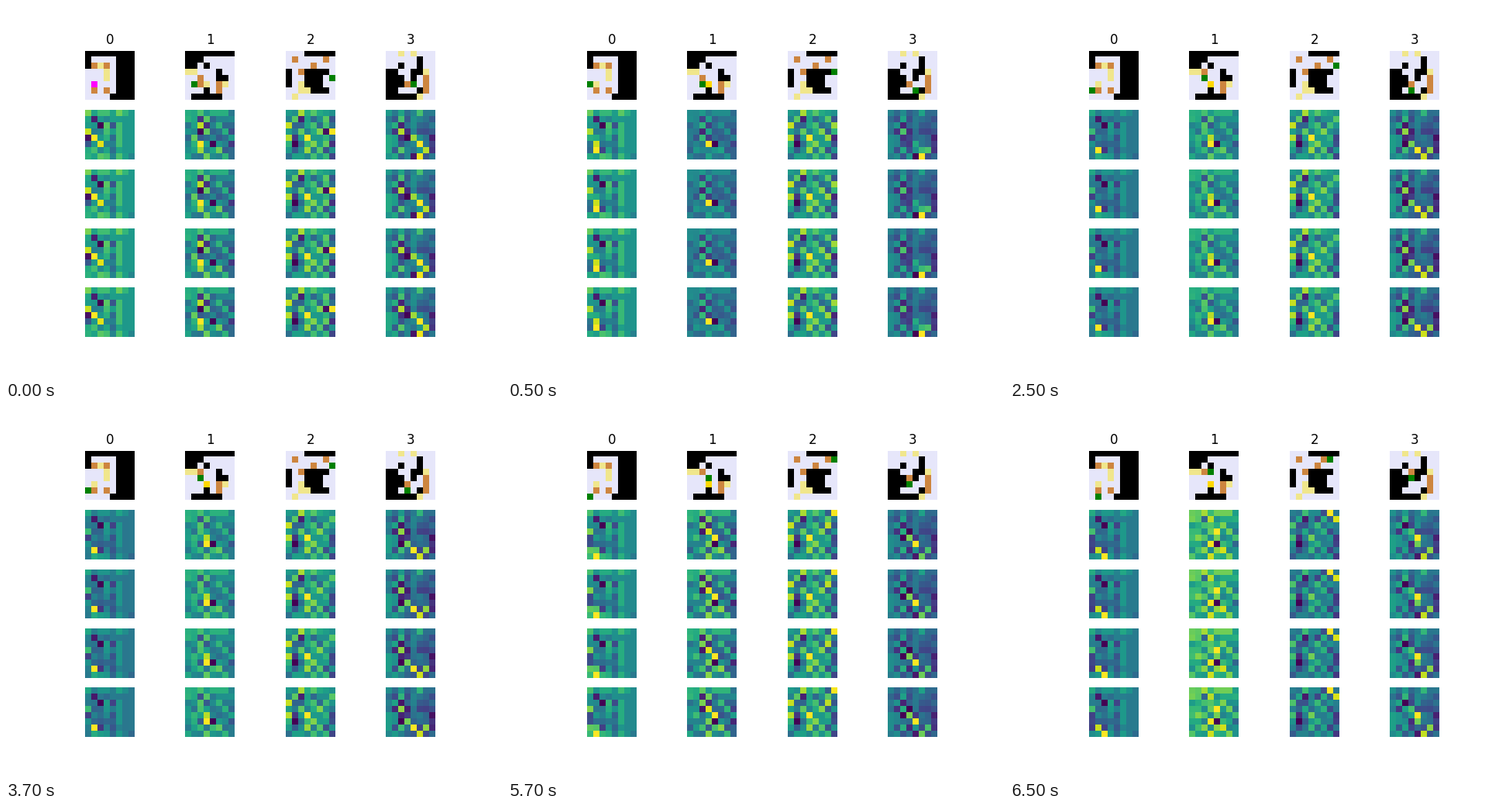
Write a matplotlib script that moves like this. It is 640 px wide and 480 px high and loops after 8000 ms.

```python
import matplotlib.pyplot as plt
import numpy as np
from matplotlib.animation import FuncAnimation
from matplotlib.colors import to_rgb

# '#' wall, '$' box, '.' target, '@' player, '+' player on target
LEVELS = [
    ("########|#    ###|#$.$ ###|   . ###|   . ###| +   ###| $ $ ###|    ####", "LDDR"),
    ("########|###     |## #    |..   #  |  $  ## | @$. $. |   # $  | #####  ", "RURU"),
    ("   #####| $    $ |    $   |# $#### |#  ### @|# .###  |  ..### | .      ", "UUUL"),
    ("  . .   |     #  |  #  #  |##  ##. |### # $ |###$@ $ |##   #$ |#####.  ", "DLUU"),
]
STEPS = {"L": (0, -1), "R": (0, 1), "U": (-1, 0), "D": (1, 0)}
KERNELS = {
    "wall": [[-.35, .65, -.3], [.23, -.4, .3], [-.28, .48, -.28]],
    "box": [[.25, .15, .3], [-.55, .45, -.15], [.1, -.35, -.25]],
    "target": [[0, .2, 0], [-.1, .1, -.3], [.25, .2, -.6]],
    "player": [[.6, -.2, .4], [1.3, .3, 0], [.1, .95, -.5]],
}
TOP_EDGE, RIGHT_EDGE = .3, -.26
MAP_ROWS = 4


def parse(text):
    grid = np.array([list(row) for row in text.split("|")])
    return {
        "wall": grid == "#",
        "box": grid == "$",
        "target": np.isin(grid, [".", "+"]),
        "player": np.isin(grid, ["@", "+"]),
    }


def move(state, key):
    """Return the state after one step, pushing a box if one is ahead."""
    dy, dx = STEPS[key]
    y, x = np.argwhere(state["player"])[0]
    y, x = y + dy, x + dx
    box = state["box"].copy()
    if box[y, x]:
        box[y, x] = False
        box[y + dy, x + dx] = True
    player = np.zeros_like(box)
    player[y, x] = True
    return {**state, "box": box, "player": player}


def picture(state):
    rgb = np.full((8, 8, 3), to_rgb("lavender"))
    target = state["target"]
    layers = [
        (state["wall"], "black"),
        (target, "khaki"),
        (state["box"], "peru"),
        (state["box"] & target, "gold"),
        (state["player"], "green"),
        (state["player"] & target, "magenta"),
    ]
    for mask, color in layers:
        rgb[mask] = to_rgb(color)
    return rgb


def activation(state):
    """Sum of 3x3 filters over the tile layers, scaled to 0..1."""
    layers = {**state, "target": state["target"] & ~state["box"]}
    heat = np.zeros((8, 8))
    heat[0] += TOP_EDGE
    heat[:, 7] += RIGHT_EDGE
    for name, kernel in KERNELS.items():
        padded = np.pad(layers[name].astype(float), 1)
        for (i, j), weight in np.ndenumerate(np.array(kernel)):
            heat += weight * padded[i:i + 8, j:j + 8]
    return (heat - heat.min()) / np.ptp(heat)


def play(text, keys):
    states = [parse(text)]
    for key in keys:
        states.append(move(states[-1], key))
    return [(picture(s), activation(s)) for s in states]


games = [play(*level) for level in LEVELS]

fig, axes = plt.subplots(MAP_ROWS + 1, len(games), figsize=(6.4, 4.8), dpi=100)
images = []
for col, game in enumerate(games):
    axes[0, col].set_title(str(col))
    board, heat = game[0]
    column = [axes[0, col].imshow(board)]
    column += [ax.imshow(heat, cmap="viridis", vmin=0, vmax=1)
               for ax in axes[1:, col]]
    images.append(column)
for ax in axes.flat:
    ax.axis("off")


def update(frame):
    step = (frame + 3) // 4
    for game, (board_image, *heat_images) in zip(games, images):
        board, heat = game[step]
        board_image.set_data(board)
        for image in heat_images:
            image.set_data(heat)
    return [image for column in images for image in column]


anim = FuncAnimation(fig, update, frames=16, interval=500, repeat=True)
plt.show()
```
